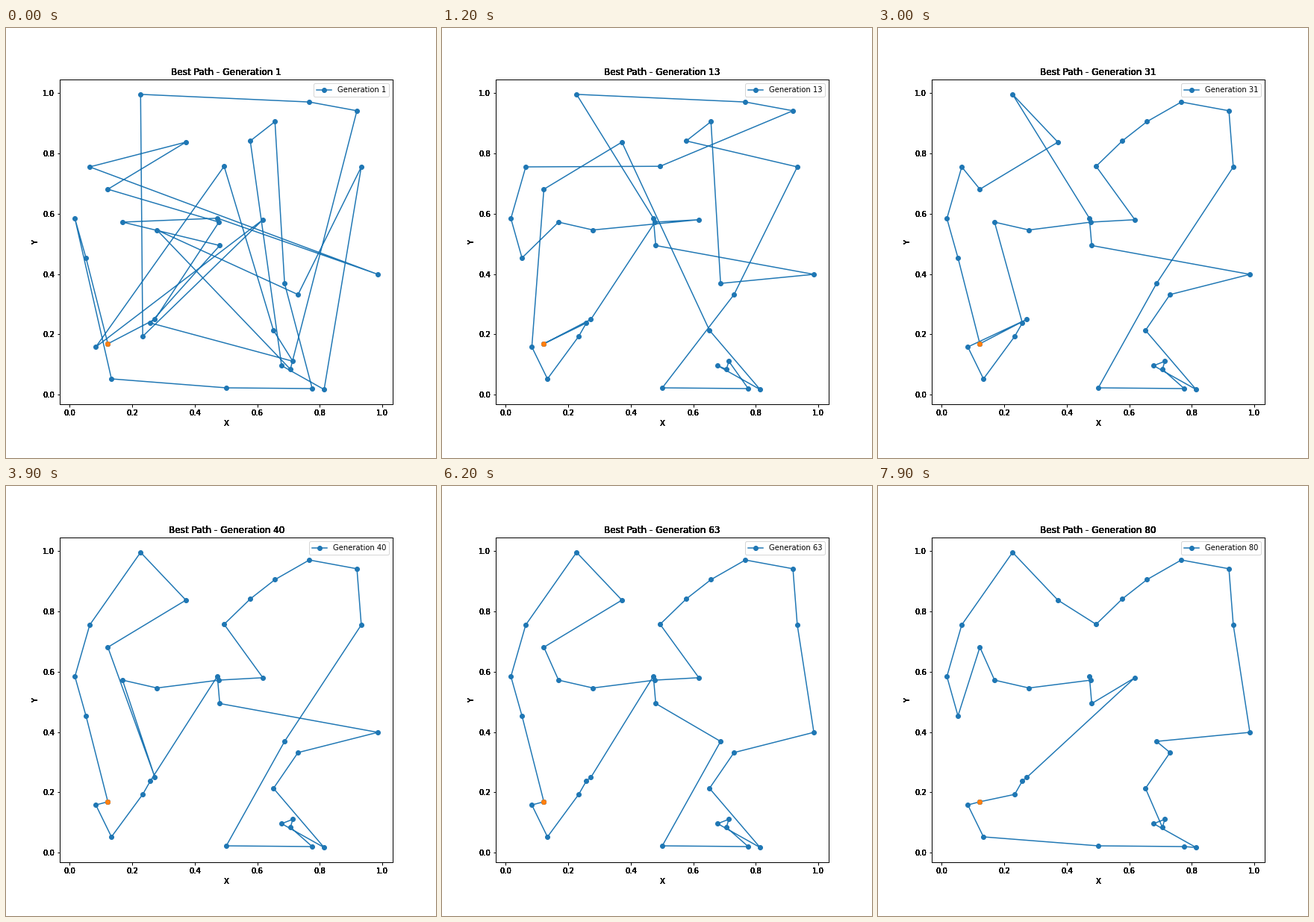
Write a matplotlib script that moves like this. It is 576 px wide and 576 px high and loops after 8 s.

```python
import itertools

import matplotlib.pyplot as plt
import numpy as np
from matplotlib.animation import FuncAnimation

FRAMES, INTERVAL = 80, 100

NAMES = "ABCDEFGHIJKLMNOPQRSTUVWXYZabcdefgh"
CITIES = dict(zip(NAMES, [
    (.2267, .9953), (.7667, .970), (.919, .941), (.6567, .905), (.5777, .841),
    (.3717, .837), (.933, .755), (.494, .757), (.064, .755), (.122, .681),
    (.4725, .585), (.4775, .572), (.618, .580), (.169, .572), (.279, .546),
    (.480, .4945), (.986, .399), (.0165, .584), (.052, .4535), (.6875, .369),
    (.7305, .332), (.652, .2135), (.714, .111), (.706, .0845), (.678, .0965),
    (.814, .0175), (.776, .0205), (.501, .023), (.1335, .0527),
    (.0835, .1585), (.122, .169), (.2335, .1935), (.258, .238), (.2725, .250),
]))

# Best route at milestone generations, each starting at city "e"
MILESTONES = {
    1: "ehLJFIQKNPgWVHdMfABCXOUGZYEDTabcRS",
    6: "ecRSgbaWHNIMLOCBAfKPQTDEGUXYZVFJdh",
    13: "egfcdJFVZYXWabUGEDTQPKABCHIRSNOMLh",
    22: "ehMLONgfcdHCBAKPQUVZYXWabTGEDFJIRS",
    40: "edcfgKPQUVZYWXabTGCBDEHMLONhJFAIRS",
    63: "edcfghKPTbaXWYZVUQGCBDEHMLONJFAIRS",
    80: "efghMPKLONJSRIAFHEDBCGQTUVXWYZabcd",
}


def dist(a, b):
    return np.hypot(CITIES[a][0] - CITIES[b][0], CITIES[a][1] - CITIES[b][1])


def evolve(route, goal):
    """Reverse segments of route, shortest first, until it becomes goal."""
    wanted = {frozenset(e) for e in zip(goal, goal[1:] + goal[0])}
    steps = [route]
    while True:
        best = (0, 0, None)
        ring = route + route[0]
        for i, j in itertools.combinations(range(1, len(route)), 2):
            a, b, c, d = ring[i - 1], ring[i], ring[j], ring[j + 1]
            gain = sum(frozenset(e) in wanted for e in (a + c, b + d))
            gain -= sum(frozenset(e) in wanted for e in (a + b, c + d))
            if gain > 0:
                saved = dist(a, b) + dist(c, d) - dist(a, c) - dist(b, d)
                if best[2] is None or (gain, saved) > best[:2]:
                    best = (gain, saved, (i, j))
        if best[2] is None:
            break
        i, j = best[2]
        route = route[:i] + route[i:j + 1][::-1] + route[j + 1:]
        steps.append(route)
    if {frozenset(e) for e in zip(route, route[1:] + route[0])} != wanted:
        steps.append(goal)
    return steps


def build_history():
    history = {}
    for (g0, r0), (g1, r1) in itertools.pairwise(MILESTONES.items()):
        steps = evolve(r0, r1)
        for g in range(g0, g1 + 1):
            history[g] = steps[(g - g0) * (len(steps) - 1) // (g1 - g0)]
    return history


def xy(route):
    return np.array([CITIES[c] for c in route + route[0]]).T


def harden(text, passes=8):
    """Overdraw a text so that its soft edges turn solid."""
    draw = text.draw

    def repeat(renderer):
        for _ in range(passes):
            draw(renderer)

    text.draw = repeat


history = build_history()

plt.rcParams.update({
    "font.family": "DejaVu Sans",
    "axes.linewidth": 1,
    "xtick.major.width": 1,
    "ytick.major.width": 1,
})
fig, ax = plt.subplots(figsize=(8, 8), dpi=72)
fig.subplots_adjust(left=.125, right=.9, bottom=.125, top=.88)

line, = ax.plot(*xy(history[1]), "o-", color="C0", label="Generation 1")
ax.plot(*CITIES["e"], "o", color="C1")
title = ax.set_title("Best Path - Generation 1")
ax.set_xlabel("X")
ax.set_ylabel("Y")
legend_text = ax.legend(loc="upper right").get_texts()[0]

for text in (title, ax.xaxis.label, ax.yaxis.label,
             *ax.get_xticklabels(), *ax.get_yticklabels()):
    harden(text)


def update(frame):
    gen = frame + 1
    line.set_data(*xy(history[gen]))
    title.set_text(f"Best Path - Generation {gen}")
    legend_text.set_text(f"Generation {gen}")
    return line, title, legend_text


anim = FuncAnimation(fig, update, frames=FRAMES, interval=INTERVAL,
                     repeat=True, repeat_delay=0)
plt.show()
```
